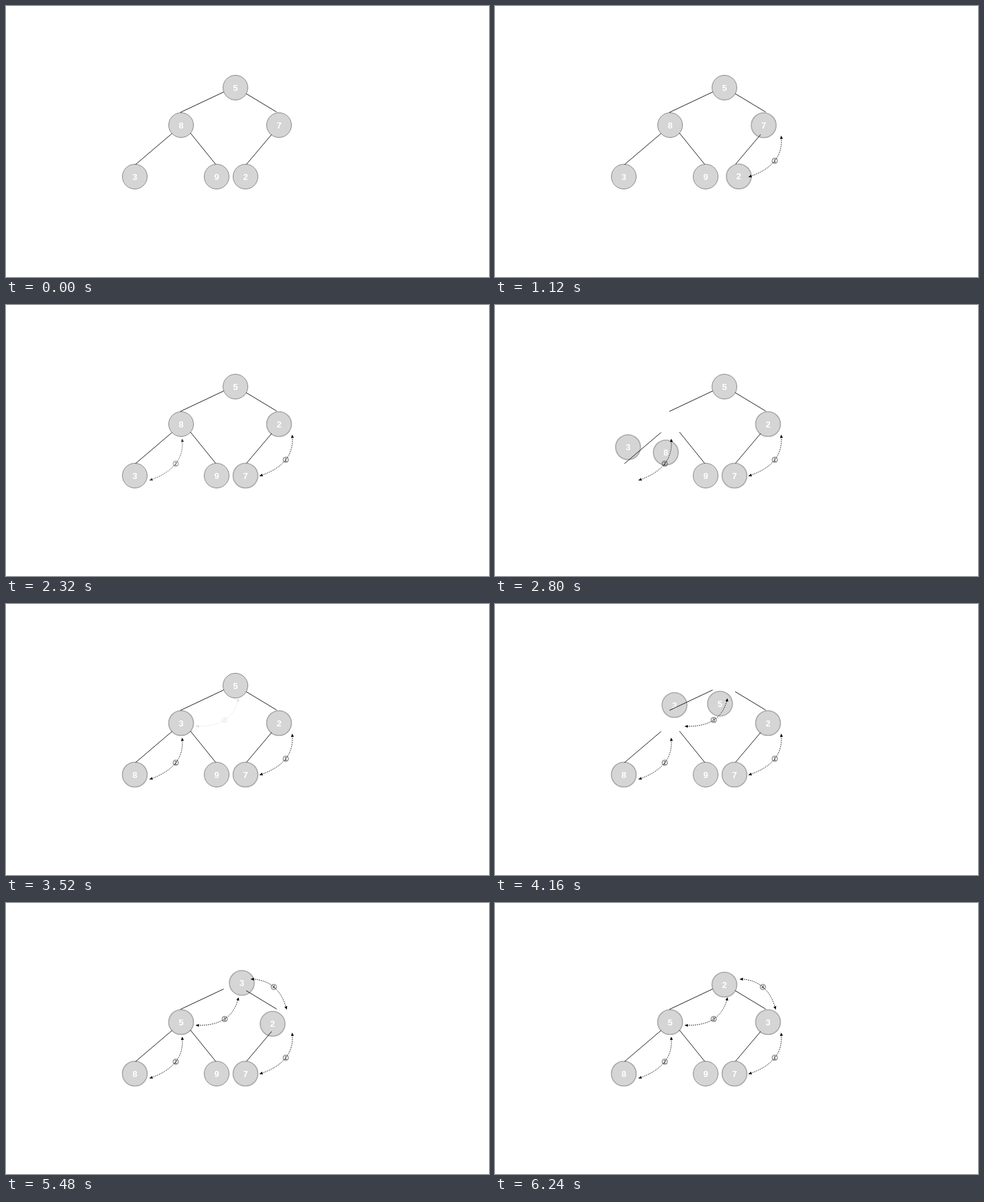
Animation, 720 px wide and 405 px high, one loop 6760 ms. Source, as an HTML page with a canvas:

```html
<!DOCTYPE html>
<html lang="en">
<head>
<meta charset="utf-8">
<title>Heap construction</title>
<style>
html, body { margin: 0; width: 100%; height: 100%; overflow: hidden; background: #fff; }
canvas { display: block; }
</style>
</head>
<body>
<canvas id="stage" width="720" height="405"></canvas>
<script>
const ctx = document.getElementById('stage').getContext('2d');
const LOOP = 6760, STEP = 40, FIRST = 640, PERIOD = 1440;
const FADE = 330, MOVE_START = 335, MOVE_TIME = 930, BULGE = 25.6;

const slots = [[342, 122], [261, 178], [407, 178], [192, 255], [314, 255], [357, 255]];
const values = [5, 8, 7, 3, 9, 2];
const edges = [
  [324.5, 128.5, 260, 159], [358, 131, 403.5, 158.5], [247.5, 190.5, 193, 237],
  [275, 190, 312.5, 236.5], [396, 192, 358.5, 236.5]
];
// Slots to exchange, turning side, and the arrow's start, middle and end.
const swaps = [
  { a: 2, b: 5, side: -1, arrow: [[378, 255.5], [417, 231.3], [426.5, 194]] },
  { a: 3, b: 1, side: 1, arrow: [[214, 262], [253, 237.2], [262.5, 200]] },
  { a: 1, b: 0, side: 1, arrow: [[283, 182.7], [326, 173.3], [346.5, 141]] },
  { a: 0, b: 2, side: 1, arrow: [[365, 113.7], [399.3, 125.5], [418.3, 159]] }
];

const clamp = v => Math.max(0, Math.min(1, v));
const ease = u => (1 - Math.cos(Math.PI * u)) / 2;

// Point on the circular arc between two slots.
function onArc([x1, y1], [x2, y2], side, f) {
  const dx = x2 - x1, dy = y2 - y1, len = Math.hypot(dx, dy);
  const r = (len * len / 4 + BULGE * BULGE) / (2 * BULGE);
  const half = Math.asin(len / 2 / r), angle = half * (2 * f - 1);
  const along = (len / 2 + r * Math.sin(angle)) / len;
  const off = side * r * (Math.cos(angle) - Math.cos(half)) / len;
  return [x1 + dx * along + dy * off, y1 + dy * along - dx * off];
}

function label(text, x, y, size, color, weight = '') {
  ctx.font = `${weight} ${size}px "Liberation Sans", Arial, sans-serif`;
  ctx.textAlign = 'center';
  ctx.fillStyle = color;
  ctx.fillText(text, x, y + size * 0.35);
}

function circle(x, y, r) {
  ctx.beginPath();
  ctx.arc(x, y, r, 0, 2 * Math.PI);
}

function drawNode({ value, pos: [x, y], moved }) {
  circle(x, y, 18.5);
  ctx.fillStyle = '#d5d5d5';
  ctx.fill();
  ctx.lineWidth = moved ? 1.6 : 1;
  ctx.strokeStyle = moved ? '#a9a9a9' : '#8a8a8a';
  ctx.stroke();
  label(value, x, y, 13, '#fff', 'bold');
}

function arrowHead([x, y], [fromX, fromY]) {
  ctx.save();
  ctx.translate(x, y);
  ctx.rotate(Math.atan2(y - fromY, x - fromX));
  ctx.beginPath();
  ctx.moveTo(0, 0);
  ctx.lineTo(-4.5, -2.2);
  ctx.lineTo(-4.5, 2.2);
  ctx.fill();
  ctx.restore();
}

function drawArrow([start, mid, end], number, alpha) {
  const bend = mid.map((m, i) => 2 * m - (start[i] + end[i]) / 2);
  ctx.globalAlpha = alpha;
  ctx.strokeStyle = ctx.fillStyle = '#000';
  ctx.lineWidth = 1;
  ctx.setLineDash([1.5, 1.5]);
  ctx.beginPath();
  ctx.moveTo(...start);
  ctx.quadraticCurveTo(...bend, ...end);
  ctx.stroke();
  ctx.setLineDash([]);
  arrowHead(start, bend);
  arrowHead(end, bend);
  circle(...mid, 4);
  ctx.lineWidth = 0.6;
  ctx.stroke();
  label(number, ...mid, 7, '#000');
  ctx.globalAlpha = 1;
}

function draw(time) {
  const nodes = values.map((value, i) => ({ value, pos: slots[i], moved: false }));
  const arrows = [];
  swaps.forEach(({ a, b, side, arrow }, i) => {
    const local = time - FIRST - i * PERIOD;
    if (local < 0) return;
    arrows.push([arrow, i + 1, 0.12 + 0.88 * clamp(local / FADE)]);
    const f = ease(clamp((local - MOVE_START) / MOVE_TIME));
    if (!f) return;
    [nodes[a], nodes[b]] = [nodes[b], nodes[a]];
    nodes[a].pos = onArc(slots[b], slots[a], side, f);
    nodes[b].pos = onArc(slots[a], slots[b], side, f);
    nodes[a].moved = nodes[b].moved = true;
  });

  ctx.fillStyle = '#fff';
  ctx.fillRect(0, 0, 720, 405);
  nodes.forEach(drawNode);
  ctx.strokeStyle = '#222';
  ctx.lineWidth = 1;
  for (const [x1, y1, x2, y2] of edges) {
    ctx.beginPath();
    ctx.moveTo(x1, y1);
    ctx.lineTo(x2, y2);
    ctx.stroke();
  }
  arrows.forEach(args => drawArrow(...args));
}

const begin = performance.now();
function tick() {
  const time = (performance.now() - begin) % LOOP;
  draw(Math.floor(time / STEP) * STEP);
  requestAnimationFrame(tick);
}
tick();
</script>
</body>
</html>
```
